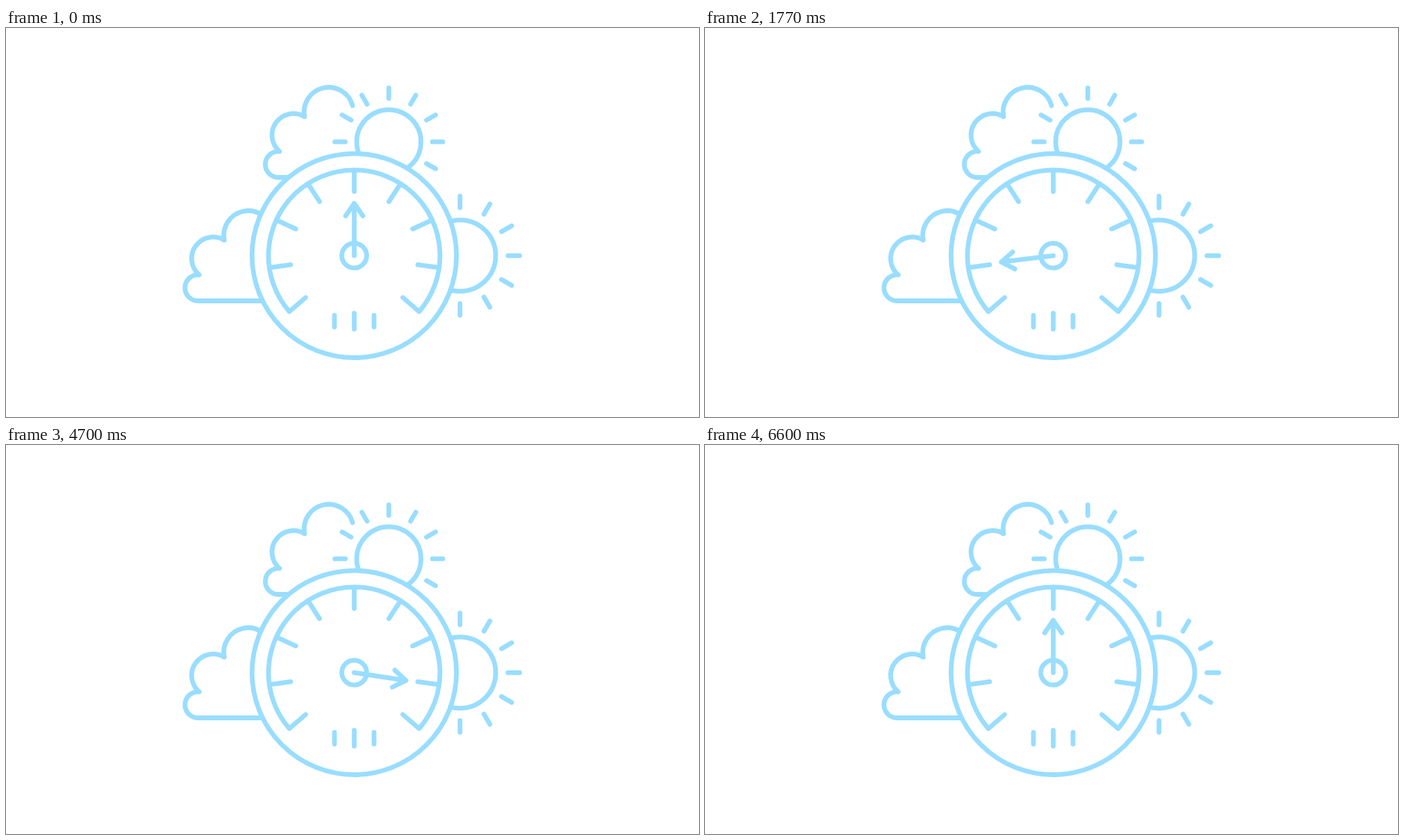
Write an HTML page that moves like this. It is 998 px wide and 561 px high and loops after 6.63 s.

```html
<!DOCTYPE html>
<html lang="en">
<head>
<meta charset="utf-8">
<title>Barometer</title>
<style>
  html, body { margin: 0; width: 100%; height: 100%; overflow: hidden; background: #fff; }
  svg { display: block; width: 100%; height: 100%; }
</style>
</head>
<body>
<svg viewBox="0 0 998 561" fill="none" stroke="#99ddff" stroke-width="6.8"
     stroke-linecap="round" stroke-linejoin="round">
  <defs>
    <path id="cloud" d="M499 112A35.43 35.43 0 0 0 430 128A30.9 30.9 0 0 0 394 178A18.8 18.8 0 1 0 393 215.5H485"/>
  </defs>
  <use href="#cloud"/>
  <g id="leftCloud"><use href="#cloud" x="-115.7" y="178"/></g>
  <g transform="translate(551.3 164.2)">
    <circle r="46.3"/>
    <path id="topRays"/>
  </g>
  <g transform="translate(653.8 328.3)">
    <g id="rightSun">
      <circle r="51.4"/>
      <path id="rightRays"/>
    </g>
  </g>
  <g transform="translate(501.5 328.3)">
    <circle r="147.2" fill="#fff"/>
    <path id="scale"/>
    <path d="M-28.5 86V103M0 83V106M28.5 86V103"/>
    <circle r="17.9"/>
    <path id="needle" d="M0 0V-75.3M-12.4 -57.3L0 -75.3L12.4 -57.3"/>
  </g>
</svg>
<script>
const LOOP = 6630;
const $ = id => document.getElementById(id);

// Point at a radius and a clockwise angle measured from the top.
const polar = (r, deg) => {
  const a = deg * Math.PI / 180;
  return `${(r * Math.sin(a)).toFixed(2)} ${(-r * Math.cos(a)).toFixed(2)}`;
};
const spoke = (r1, r2, deg) => `M${polar(r1, deg)}L${polar(r2, deg)}`;
const spokes = (r1, r2, count, step, first) =>
  Array.from({ length: count }, (_, i) => spoke(r1, r2, first + i * step)).join('');

const TICK = 32.7, RIM = 123.5;
$('topRays').setAttribute('d', spokes(62.7, 77.7, 12, 30, 0));
$('rightRays').setAttribute('d', spokes(69, 86, 12, 30, 0));
$('scale').setAttribute('d', spokes(92.5, RIM, 9, TICK, -4 * TICK) +
  `M${polar(RIM, -4 * TICK)}A${RIM} ${RIM} 0 1 1 ${polar(RIM, 4 * TICK)}`);

const ease = p => (1 - Math.cos(Math.PI * p)) / 2;

// Rises from 0 to 1 and falls back between two times.
const pulse = (t, start, end) =>
  t <= start || t >= end ? 0 : Math.sin(Math.PI * (t - start) / (end - start)) ** 2;

// [time, angle]: each swing overshoots, then settles.
const swings = [
  [0, 0], [1350, 0], [1800, -98], [2050, -90], [3780, -90],
  [4620, 100], [4960, 90], [5950, 90], [6370, -7], [6600, 0], [LOOP, 0]
];
function needleAngle(t) {
  const i = swings.findIndex(([time]) => time > t);
  const [t0, a0] = swings[i - 1], [t1, a1] = swings[i];
  return a0 + (a1 - a0) * ease((t - t0) / (t1 - t0));
}

function draw(t) {
  const drift = pulse(t, 2000, 4000);
  const glow = pulse(t, 4850, 6250);
  const set = (id, value) => $(id).setAttribute('transform', value);
  set('topRays', `rotate(${-5.5 * pulse(t, 0, 1200)})`);
  set('leftCloud', `translate(${318 + 7.7 * drift} 350) scale(${1 + 0.042 * drift}) translate(-318 -350)`);
  set('rightSun', `scale(${1 + 0.113 * glow})`);
  set('rightRays', `rotate(${-5.5 * glow})`);
  set('needle', `rotate(${needleAngle(t)})`);
}

const start = performance.now();
function tick() {
  draw((performance.now() - start) % LOOP);
  requestAnimationFrame(tick);
}
tick();
</script>
</body>
</html>
```
